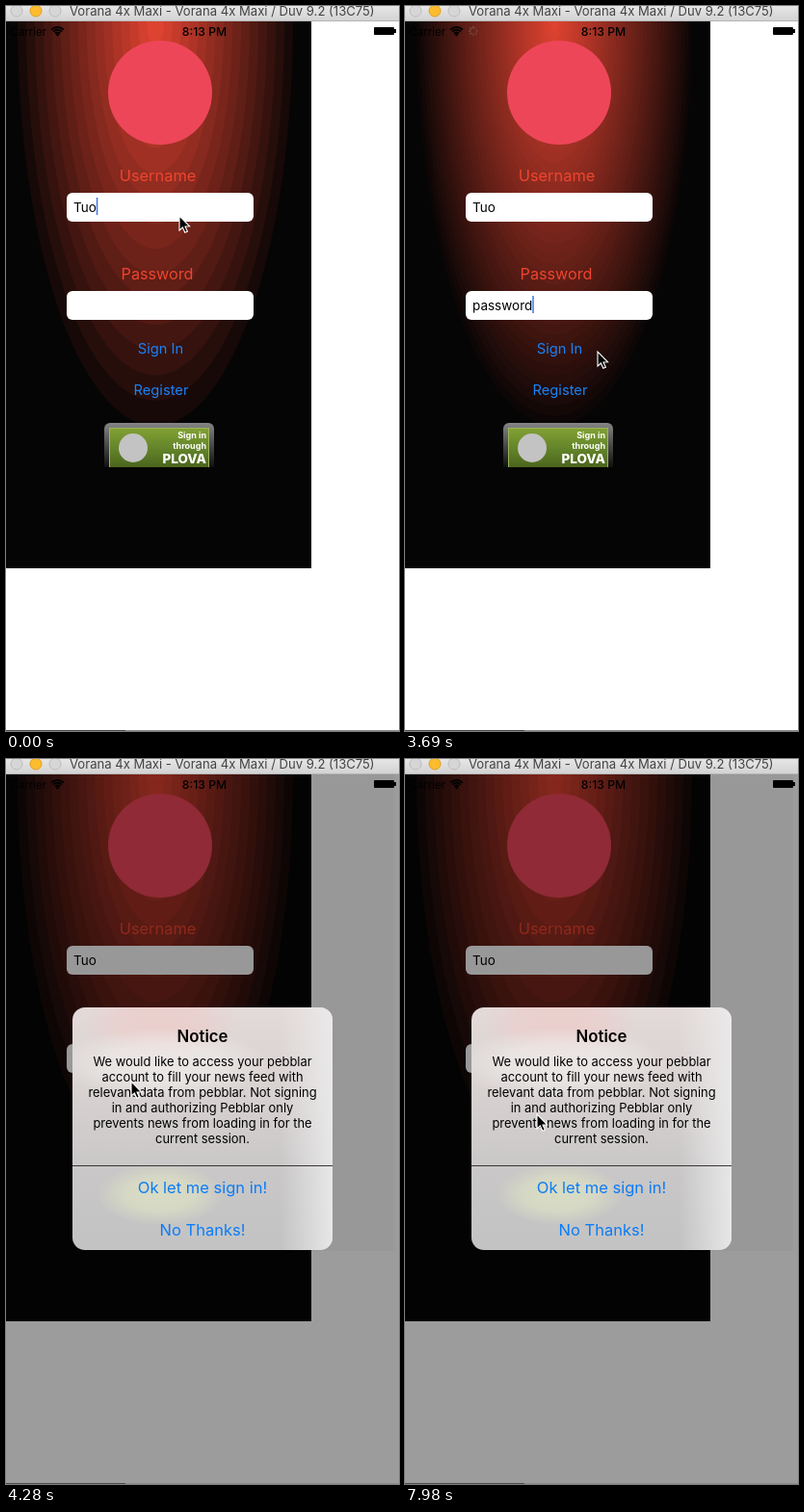
An HTML page with a canvas that plays this animation: 408 px wide and 753 px high, repeating every 8000 ms.

```html
<!DOCTYPE html>
<html lang="en">
<head>
<meta charset="utf-8">
<title>Sign in notice</title>
<style>
  html, body { margin: 0; width: 100%; height: 100%; overflow: hidden; background: #fff; }
  canvas { display: block; }
</style>
</head>
<body>
<canvas id="stage" width="408" height="753"></canvas>
<script>
const ctx = document.getElementById('stage').getContext('2d');
const LOOP = 8000, TICK = 147.9, FIRST_TICK = 280;
const UI = 'Inter, sans-serif';
const RED = '#ee452f', BLUE = '#1783fb';
const NOTICE = [
  'We would like to access your pebblar',
  'account to fill your news feed with',
  'relevant data from pebblar. Not signing',
  'in and authorizing Pebblar only',
  'prevents news from loading in for the',
  'current session.'
];

// Pointer keyframes: tick, x, y. It follows the lines of the notice once that is open.
const POINTER = [
  [0, 180, 218], [8, 180, 218], [10, 213, 262], [12, 203, 337], [13, 198, 351],
  [16, 198, 353], [18, 200, 359], [23, 200, 359], [24, 200, 357], [25, 197, 362],
  [27, 130, 335], [29, 112, 314], [31, 172, 313], [33, 233, 312], [35, 274, 315],
  [37, 143, 328], [40, 195, 329], [43, 280, 330], [45, 126, 345], [47, 180, 347],
  [50, 294, 347], [51, 215, 358], [52, 137, 369]
];

function rect(x, y, w, h, fill) {
  ctx.fillStyle = fill;
  ctx.fillRect(x, y, w, h);
}

function roundRect(x, y, w, h, r, fill) {
  ctx.beginPath();
  ctx.roundRect(x, y, w, h, r);
  ctx.fillStyle = fill;
  ctx.fill();
}

function ellipse(x, y, rx, ry, fill) {
  ctx.beginPath();
  ctx.ellipse(x, y, rx, ry, 0, 0, Math.PI * 2);
  ctx.fillStyle = fill;
  ctx.fill();
}

// y is the middle of the capitals.
function text(str, x, y, size, fill, { align = 'center', weight = 400 } = {}) {
  ctx.font = `${weight} ${size}px ${UI}`;
  ctx.textAlign = align;
  ctx.fillStyle = fill;
  ctx.fillText(str, x, y + size * 0.36);
}

function linear(x0, y0, x1, y1, ...colors) {
  const g = ctx.createLinearGradient(x0, y0, x1, y1);
  colors.forEach((c, i) => g.addColorStop(i / (colors.length - 1), c));
  return g;
}

function softSpot(x, y, rx, ry, rgb, alpha) {
  ctx.save();
  ctx.translate(x, y);
  ctx.scale(rx, ry);
  const g = ctx.createRadialGradient(0, 0, 0, 0, 0, 1);
  g.addColorStop(0, `rgba(${rgb},${alpha})`);
  g.addColorStop(0.55, `rgba(${rgb},${alpha * 0.8})`);
  g.addColorStop(1, `rgba(${rgb},0)`);
  ellipse(0, 0, 1, 1, g);
  ctx.restore();
}

function drawGlow(bands) {
  ctx.save();
  ctx.beginPath();
  ctx.rect(0, 16, 317, 568);
  ctx.clip();
  rect(0, 16, 317, 568, '#050505');
  for (let i = 1; i <= bands; i++) {
    const size = 1 - (i - 1) / bands, p = (i / bands) ** 0.9;
    const mix = (a, b) => Math.round(a + (b - a) * p);
    ellipse(155, 16, 143 * size, 420 * size, `rgb(${mix(5, 222)},${mix(4, 66)},${mix(4, 48)})`);
  }
  ctx.restore();
}

function drawTitleBar() {
  rect(0, 0, 408, 15, linear(0, 0, 0, 15, '#e6e6e6', '#d3d3d3'));
  rect(0, 15, 408, 1, '#b4b4b4');
  ['#d6d6d6', '#fdbc2e', '#d6d6d6'].forEach((fill, i) => {
    ellipse(11 + i * 20, 5, 6, 6, fill);
    ctx.strokeStyle = i === 1 ? '#dfa023' : '#bcbcbc';
    ctx.lineWidth = 1;
    ctx.stroke();
  });
  text('Vorana 4x Maxi - Vorana 4x Maxi / Duv 9.2 (13C75)', 66, 5.5, 13.1, '#434343', { align: 'left' });
}

function drawStatusBar(tick) {
  text('Carrier', 42, 27, 11.5, '#000', { align: 'right' });
  ctx.strokeStyle = '#000';
  ctx.lineWidth = 1.8;
  for (const r of [3.5, 6.3, 9]) {
    ctx.beginPath();
    ctx.arc(53.5, 31, r, -Math.PI * 0.75, -Math.PI * 0.25);
    ctx.stroke();
  }
  ellipse(53.5, 30, 1.3, 1.3, '#000');
  if (tick >= 18 && tick < 25) {
    ctx.lineWidth = 1.2;
    for (let i = 0; i < 8; i++) {
      const a = i * Math.PI / 4, shade = ((i - tick) % 8 + 8) % 8;
      ctx.strokeStyle = `rgba(125,105,100,${0.35 + shade * 0.08})`;
      ctx.beginPath();
      ctx.moveTo(71 + 2.4 * Math.cos(a), 26 + 2.4 * Math.sin(a));
      ctx.lineTo(71 + 5 * Math.cos(a), 26 + 5 * Math.sin(a));
      ctx.stroke();
    }
  }
  text('8:13 PM', 206, 27, 12.2, '#000', { weight: 500 });
  roundRect(382, 22, 21, 8, 1, '#000');
  rect(403, 24, 2, 4, '#000');
}

function drawField(y, value, caret) {
  roundRect(63, y, 194, 30, 6, '#fff');
  text(value, 70, y + 14.7, 13.5, '#000', { align: 'left' });
  if (caret) rect(70 + ctx.measureText(value).width, y + 5, 1.5, 18, '#3f76e8');
}

function drawBadge() {
  roundRect(102, 433, 114, 46, [6, 6, 0, 0], linear(0, 433, 0, 479, '#858585', '#4a4a4a', '#101010'));
  rect(107, 438, 104, 41, '#9db45c');
  rect(108, 439, 102, 40, linear(0, 439, 0, 479, '#82a033', '#64852a', '#4b651d'));
  ellipse(132, 459, 15, 15, '#c3c3c3');
  const style = { align: 'right', weight: 700 };
  text('Sign in', 208, 446, 9, '#fff', style);
  text('through', 208, 457, 9, '#fff', style);
  text('PLOVA', 208, 470.5, 13.5, '#fff', { ...style, weight: 800 });
}

function drawForm(tick) {
  const typed = tick < 8 ? Math.max(0, Math.min(tick + 1, 7)) : 8;
  const caretOn = tick >= 0 && tick < 24 && (tick < 8 || (tick - 8) % 7 < 4);
  ellipse(160, 90, 54, 54, '#ee4659');
  text('Username', 157.5, 176, 16.4, RED);
  drawField(194, 'Tuo', tick < 0);
  text('Password', 157, 278, 16.2, RED);
  drawField(296, 'password'.slice(0, typed), caretOn);
  text('Sign In', 160.5, 355.5, 14.7, BLUE);
  text('Register', 161, 399, 14.7, BLUE);
  drawBadge();
}

function fillFrostedPanel() {
  ctx.save();
  ctx.beginPath();
  ctx.roundRect(69, 258, 270, 252, 13);
  ctx.clip();
  rect(69, 258, 270, 252, linear(0, 258, 0, 510, '#e3dad9', '#d8d2d1', '#c9c7c7', '#c3c3c3'));
  softSpot(160, 275, 80, 40, '240,200,196', 0.6);
  softSpot(163, 317, 110, 38, '240,238,236', 0.75);
  softSpot(160, 452, 66, 32, '219,223,196', 0.9);
  rect(285, 258, 54, 252, linear(285, 0, 339, 0, 'rgba(235,235,235,0)', 'rgba(235,235,235,.9)'));
  ctx.restore();
}

function drawAlert(tick) {
  const scale = tick === 24 ? 1.081 : tick === 25 ? 1.007 : 1;
  ctx.save();
  ctx.translate(204, 384);
  ctx.scale(scale, scale);
  ctx.translate(-204, -384);
  if (tick >= 26) {
    fillFrostedPanel();
    rect(69, 422, 270, 1, '#3b3636');
  } else {
    const opening = tick === 24;
    roundRect(69, 258, 270, 252, 13, opening ? 'rgba(250,248,247,.59)' : '#f1f1ef');
    rect(69, 422, 270, 1, opening ? 'rgba(90,90,90,.4)' : '#d2d2d2');
    if (!opening) rect(69, 466, 270, 1, '#d2d2d2');
  }
  const link = tick === 24 ? '#0d4f99' : '#0b7cf8';
  text('Notice', 204, 288, 16.8, '#000', { weight: 600 });
  NOTICE.forEach((line, i) => text(line, 204, 314 + i * 16, 12.9, '#000'));
  text('Ok let me sign in!', 204, 445.5, 16.5, link);
  text('No Thanks!', 204, 489.5, 16.5, link);
  ctx.restore();
}

function pointerAt(tick) {
  const t = Math.max(tick, 0);
  const next = POINTER.findIndex(p => p[0] >= t);
  if (next <= 0) return POINTER[0].slice(1);
  const [t0, x0, y0] = POINTER[next - 1], [t1, x1, y1] = POINTER[next];
  const p = (t - t0) / (t1 - t0);
  return [x0 + (x1 - x0) * p, y0 + (y1 - y0) * p];
}

function drawPointer(x, y) {
  ctx.save();
  ctx.translate(x, y);
  ctx.beginPath();
  [[0, 0], [0, 15], [3.4, 12], [5.8, 17.3], [8.4, 16.2], [6, 11], [10.6, 10.8]]
    .forEach(([px, py]) => ctx.lineTo(px, py));
  ctx.closePath();
  ctx.fillStyle = '#000';
  ctx.fill();
  ctx.strokeStyle = '#fff';
  ctx.lineWidth = 1.1;
  ctx.stroke();
  ctx.restore();
}

function draw(time) {
  const tick = Math.min(Math.floor((time - FIRST_TICK) / TICK), 52);
  rect(0, 0, 408, 753, '#fff');
  drawGlow(tick >= 20 && tick <= 24 ? 40 : 16);
  drawStatusBar(tick);
  drawForm(tick);
  if (tick >= 24) {
    rect(0, 16, 408, 737, `rgba(0,0,0,${tick === 24 ? 0.23 : 0.39})`);
    if (tick >= 26) rect(0, 16, 403, 495, 'rgba(0,0,0,.025)');
    drawAlert(tick);
  }
  rect(0, 752, 408, 1, '#8c8c8c');
  rect(0, 752, 124, 1, '#4a4a4a');
  drawTitleBar();
  drawPointer(...pointerAt(tick));
}

const start = performance.now();
function loop() {
  draw((performance.now() - start) % LOOP);
  requestAnimationFrame(loop);
}
loop();
</script>
</body>
</html>
```
